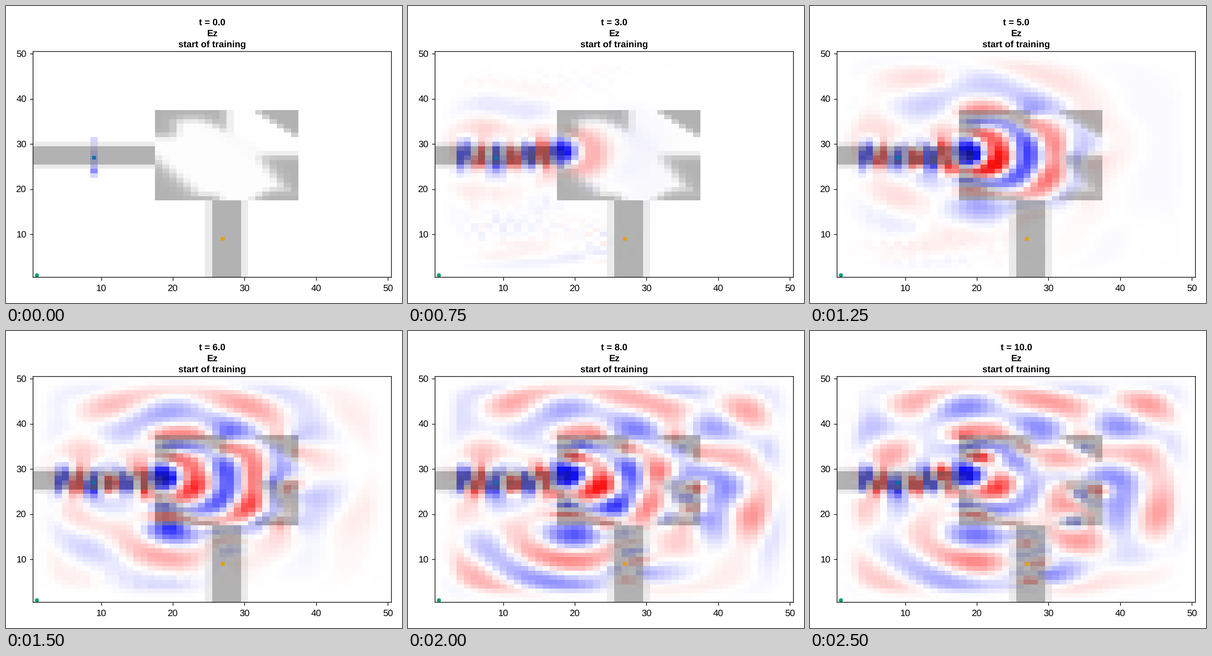
A matplotlib script for the animation above (2560 ms loop, 864 by 648 pixels).

```python
import numpy as np
import matplotlib.pyplot as plt
from matplotlib.animation import FuncAnimation

W, H, DPI = 864, 648, 100
PT = 72 / DPI                      # points per pixel
U = 1.44                           # pixels per layout unit
LEFT, RIGHT, TOP, BOTTOM = 41 * U, 584 * U, 69 * U, 411 * U

N = 50                             # cells per side
DX, DT = 1 / 16, 1 / 32            # in wavelengths and periods
STEPS = 8                          # time steps per picture
PICTURES = 41
EPS_CLAD, EPS_CORE = 2.25, 12.25
SIGMA, LAYER = 20, 4               # absorbing border

plt.rcParams["font.family"] = "Liberation Sans"
plt.rcParams["text.hinting"] = "none"


def edge(d, width):
    """Soft step: 0 for negative d, 1 for positive d."""
    return 1 / (1 + np.exp(-d / width))


def design_block():
    """Density of the 20 x 20 block as a union of soft-edged shapes."""
    y, x = np.mgrid[18:38, 18:38].astype(float)
    ridge = 0.12 * np.exp(-((x + y - 60) / 2) ** 2)
    shapes = [
        0.13 - 0.08 * edge(x + y - 61, 0.8) + ridge,
        # upper left: block and hooked band
        edge(20.9 - x, 0.5) * edge(y - 31.2, 0.5),
        edge(y - 35 + 0.13 * (x - 22.7) ** 2, 0.6) * edge(27.9 - x, 0.45),
        # lower left: wedge and foot
        edge(18 + 0.75 * (27 - y) - x, 0.85),
        edge(19.1 - y, 0.4) * edge(26.9 - x, 0.5),
        # lower right: two wedges
        edge(x - 32.2 - 0.5 * (26 - y), 0.6) * edge(27.9 - y, 0.5),
        edge(x - 31 - 0.9 * (y - 18), 0.6) * edge(20.6 - y, 0.6),
        # upper right: corner
        edge(x + y - 68.6, 0.3),
    ]
    return np.max(shapes, axis=0)


def geometry():
    """Core fraction of every cell, indexed [y, x]."""
    fill = np.zeros((N, N))
    guide = np.array([0.5, 1, 1, 1, 1, 0.5])
    fill[24:30, :17] = guide[:, None]
    fill[:17, 24:30] = guide
    fill[17:37, 17:37] = design_block()
    return fill


def loss(y, x):
    """Conductivity rising linearly towards the border."""
    def depth(p):
        return np.maximum(np.maximum(LAYER + 0.5 - p, p - (N - LAYER + 0.5)), 0)
    return SIGMA * np.maximum(depth(y)[:, None], depth(x)[None, :]) / LAYER


def decay(base, sigma):
    """Coefficients of a half-implicit update with matched loss."""
    down = base * (1 / DT + sigma / 2)
    return base * (1 / DT - sigma / 2) / down, 1 / down


def simulate(fill):
    """Ez at each picture time, from a Yee scheme."""
    mid, face = np.arange(1, N + 1), np.arange(N + 1) + 0.5
    ea, eb = decay(EPS_CLAD + (EPS_CORE - EPS_CLAD) * fill, loss(mid, mid))
    xa, xb = decay(1, loss(face, mid))
    ya, yb = decay(1, loss(mid, face))

    offset = np.arange(-4, 5)
    source = np.zeros((N, N))
    source[22:31, 8] = 66 * np.exp(-offset**2 / (2 * 1.8**2))

    ez = np.zeros((N, N))
    hx, hy = np.zeros((N + 1, N)), np.zeros((N, N + 1))
    fields = []
    for n in range((PICTURES - 1) * STEPS + 1):
        padded = np.pad(ez, 1)
        hx = xa * hx - xb * np.diff(padded[:, 1:-1], axis=0) / DX
        hy = ya * hy + yb * np.diff(padded[1:-1], axis=1) / DX
        curl = (np.diff(hy, axis=1) - np.diff(hx, axis=0)) / DX
        ez = ea * ez + eb * (curl - source * np.cos(2 * np.pi * n * DT))
        if n % STEPS == 0:
            fields.append(ez)
    return fields


def paint(field, fill):
    """Field colours under a translucent grey map of the material."""
    # an odd number of colours keeps zero pure white
    cmap = plt.get_cmap("seismic", 1025)
    base = cmap(np.clip((field + 1) / 2, 0, 1))[..., :3]
    alpha = 0.6 * fill[..., None]
    grey = 1 - 0.498 * fill[..., None]
    return base * (1 - alpha) + grey * alpha


fill = geometry()
pictures = [paint(field, fill) for field in simulate(fill)]

fig = plt.figure(figsize=(W / DPI, H / DPI), dpi=DPI, facecolor="white")
ax = fig.add_axes([LEFT / W, 1 - BOTTOM / H, (RIGHT - LEFT) / W, (BOTTOM - TOP) / H])
image = ax.imshow(pictures[0], extent=(0.5, N + 0.5, 0.5, N + 0.5), origin="lower",
                  aspect="auto", interpolation="nearest")
for x, y, marker, color in ((9, 27, "s", "#0072b2"), (27, 9, "s", "#e69f00"),
                            (1, 1, "o", "#009e73")):
    ax.plot(x, y, marker, color=color, ms=8.8 * PT, mew=0, clip_on=False)

ticks = range(10, N + 1, 10)
ax.set(xlim=(0.5, N + 0.5), ylim=(0.5, N + 0.5), xticks=ticks, yticks=ticks)
ax.tick_params(length=5 * U * PT, width=U * PT, labelbottom=False, labelleft=False)
for spine in ax.spines.values():
    spine.set(linewidth=U * PT, snap=False)


def label(x, y, text, **style):
    """Text with its baseline at a pixel position."""
    return fig.text(x / W, 1 - y / H, text, size=14 * U * PT, va="baseline", **style)


for v in ticks:
    part = (v - 0.5) / N
    label(LEFT + part * (RIGHT - LEFT), 623, str(v), ha="center")
    label(44.5, BOTTOM - part * (BOTTOM - TOP) + 7.2, str(v), ha="right")

clock = label(450, 42.7, "t = 0.0", ha="center", weight="bold")
label(450, 66, "Ez", ha="center", weight="bold")
label(450, 89.5, "start of training", ha="center", weight="bold")

LOOP, TICK = 2560, 20


def update(frame):
    k = min(int((frame * TICK + 12.5) / 62.5), PICTURES - 1)
    image.set_data(pictures[k])
    clock.set_text(f"t = {k * STEPS * DT}")
    return image, clock


anim = FuncAnimation(fig, update, frames=LOOP // TICK, interval=TICK,
                     repeat=True, repeat_delay=0)
plt.show()
```
